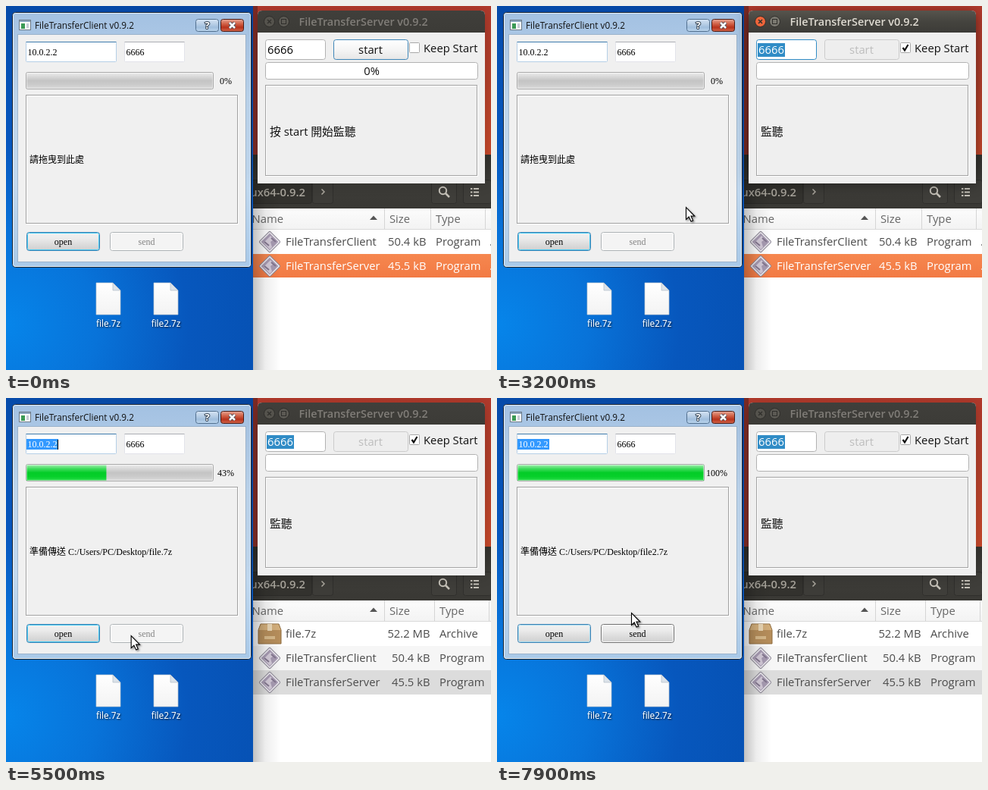
An HTML page for the animation above (8 s loop, 640 by 480 pixels).

```html
<!DOCTYPE html>
<html lang="zh-Hant">
<head>
<meta charset="utf-8">
<title>File transfer</title>
<style>
html, body { margin: 0; width: 100%; height: 100%; overflow: hidden; }
svg { display: block; width: 640px; height: 480px; }
text { white-space: pre; }
.ui { font: 14.8px "Open Sans", "Noto Sans CJK TC", "Noto Sans CJK JP", sans-serif; }
.win { font: 12px "Liberation Serif", "Noto Sans CJK TC", "Noto Sans CJK JP", serif; }
.cap { font: 11.8px "Open Sans", sans-serif; }
.mid { text-anchor: middle; }
</style>
</head>
<body>
<svg id="stage" viewBox="0 0 640 480" xmlns="http://www.w3.org/2000/svg"></svg>
<script>
const attrs = o => Object.entries(o).map(([k, v]) => ` ${k}="${v}"`).join('');
const rect = (x, y, w, h, fill, o = {}) =>
  `<rect${attrs({ x, y, width: w, height: h, fill, ...o })}/>`;
// Crisp one-pixel border around the given pixel box.
const box = (x, y, w, h, fill, stroke, rx = 0, o = {}) =>
  rect(x + .5, y + .5, w - 1, h - 1, fill, { stroke, rx, ...o });
const path = (d, o = {}) => `<path${attrs({ d, fill: 'none', ...o })}/>`;
const text = (x, y, s, cls, fill = '#000', o = {}) =>
  `<text${attrs({ x, y, class: cls, fill, ...o })}>${s}</text>`;
const group = (id, body, o = {}) => `<g${attrs({ id, ...o })}>${body}</g>`;
const circle = (cx, cy, r, fill, o = {}) => `<circle${attrs({ cx, cy, r, fill, ...o })}/>`;
const stops = colors => colors.map((c, i) =>
  `<stop offset="${i / (colors.length - 1)}" stop-color="${c}"/>`).join('');
const grad = (id, ...colors) =>
  `<linearGradient id="${id}" x2="0" y2="1">${stops(colors)}</linearGradient>`;

const defs = `<defs>
  <radialGradient id="sky" gradientUnits="userSpaceOnUse" cx="0" cy="420" r="480">
    ${stops(['#0685ea', '#0873d9', '#0757bd', '#0650b2', '#06459f'])}</radialGradient>
  <linearGradient id="vmShadow"><stop stop-color="#000" stop-opacity=".24"/>
    <stop offset=".45" stop-color="#000" stop-opacity=".07"/><stop offset="1" stop-opacity="0"/></linearGradient>
  <filter id="blur" x="-20%" y="-20%" width="140%" height="140%"><feGaussianBlur stdDeviation="9"/></filter>
  <filter id="soft" x="-30%" y="-30%" width="180%" height="180%"><feDropShadow dx="1.5" dy="1.5" stdDeviation="1" flood-opacity=".45"/></filter>
  <filter id="label" x="-20%" y="-40%" width="150%" height="200%"><feDropShadow dx="1" dy="1" stdDeviation="1" flood-opacity=".9"/></filter>
  <clipPath id="vm"><path d="M0 0H326V480H0Z"/></clipPath>
  ${grad('wall', '#b23a2c', '#b8412c', '#c94a2c')}
  ${grad('glassOn', '#a3c1e2', '#bcd4ec', '#c2d9ef', '#a9c9e8')}
  ${grad('glassOff', '#cfdfef', '#dae6f3', '#d7e4f2')}
  ${grad('closeOn', '#e6a797', '#d5694f', '#b8321b', '#d1664c')}
  ${grad('helpOn', '#d5e4f4', '#bdd2e8', '#a0bedd', '#bcd6ee')}
  ${grad('buttonUp', '#f2f2f2', '#ebebeb', '#dcdcdc', '#cfcfcf')}
  ${grad('buttonHot', '#eaf6fd', '#d5effc', '#b7e2f9', '#a7d9f5')}
  ${grad('buttonDown', '#c2e4f6', '#a9d8ef', '#7fbfe0')}
  ${grad('track', '#eeeeee', '#d9d9d9', '#c4c4c4', '#cccccc', '#dddddd')}
  ${grad('green', '#a4efb0', '#3fdc5c', '#04cc28', '#06d02a', '#2cdc4c')}
  ${grad('darkOn', '#56544d', '#45443f', '#3c3b37')}
  ${grad('darkOff', '#403f3b', '#3c3b37')}
  ${grad('bar', '#35342f', '#3e3d39', '#393834')}
  ${grad('pushUp', '#ffffff', '#f5f5f5', '#e6e6e6')}
  ${grad('pushDown', '#cfcfcf', '#dcdcdc')}
  ${grad('header', '#fcfcfc', '#f3f3f3')}
  ${grad('paper', '#ffffff', '#f3f3f3')}
  ${grad('orange', '#f6874f', '#f27a44')}
  ${grad('hover', '#7ab8f2', '#4a98e4')}
</defs>`;

const diamond = y => group('', rect(-10, -10, 20, 20, '#eeecf1', { stroke: '#8f8a98', rx: 1.5, transform: 'rotate(45)' }) +
  rect(-8, -8, 16, 16, '#a79bb2', { transform: 'rotate(45)' }) +
  path('M-8 1L1 -8L5 -3L1 0L3 7L0 10Z', { fill: '#d4cbd9' }) +
  path('M-7 0L-1 5M2 -5L8 0', { stroke: '#83778f', 'stroke-width': 2 }),
  { transform: `translate(348 ${y})` });

const crate = path('M336 298H360L363 306V324H333V306Z', { fill: '#b68e5b', stroke: '#8d6a3c' }) +
  path('M336.500 298.500H359.500L362.500 306H333.500Z', { fill: '#d2ae7b' }) +
  rect(345, 298, 6, 9, '#e9d6b4') + rect(341, 314, 14, 4, '#d7b98a');

const program = (name, size, y, id) => diamond(y - 5) +
  text(369, y, name, 'ui row', '#4c4c4c', { id }) ;

function fileManager() {
  const label = (x, s) => text(x, 286, s, 'ui', '#666');
  return rect(326, 0, 314, 480, '#fff') + rect(326, 0, 314, 196, 'url(#wall)') +
    rect(326, 0, 6, 196, '#7c2b25') +
    rect(326, 196, 314, 71, 'url(#bar)') +
    box(320, 229, 84, 32, '#33322e', '#2c2b28', 3) + box(404, 229, 28, 32, '#3d3c38', '#302f2c', 3) +
    text(395, 251, 'ux64-0.9.2', 'ui', '#aaa69d', { 'font-weight': 600, style: 'font-weight:600', 'text-anchor': 'end' }) +
    path('M416.500 241.500L420 245L416.500 248.500', { stroke: '#aaa69d', 'stroke-width': 1.5 }) +
    box(561, 229, 34, 32, '#3f3e3a', '#302f2c', 3) + box(603, 229, 38, 32, '#3f3e3a', '#302f2c', 3) +
    circle(576.5, 243.5, 4.7, 'none', { stroke: '#c5c1b8', 'stroke-width': 2 }) +
    path('M580 247L585 252', { stroke: '#c5c1b8', 'stroke-width': 2.5 }) +
    path('M613 241H615.500M613 245.500H615.500M613 250H615.500M617 241H624M617 245.500H624M617 250H624', { stroke: '#c5c1b8', 'stroke-width': 2 }) +
    rect(326, 267, 314, 27, 'url(#header)') + rect(326, 294, 314, 1, '#dadada') +
    label(324.5, 'Name') + label(506, 'Size') +
    path('M480 282L485 276.500L490 282Z', { fill: '#555' }) + rect(499, 267, 1, 27, '#d5d5d5') +
    group('wideCols', rect(560, 267, 1, 27, '#d5d5d5') + rect(632, 267, 1, 27, '#d5d5d5') + label(567, 'Type')) +
    group('shiftedCols', rect(565, 267, 1, 27, '#d5d5d5') + rect(637, 267, 1, 27, '#d5d5d5') + label(572, 'Type')) +
    group('listing', '');
}

function listing(received) {
  const right = received ? 559.5 : 554.5, kind = received ? 572 : 567;
  const row = (i, icon, name, size, type, fill = '#4c4c4c') => {
    const y = 316 + i * 32;
    return icon + text(369, y, name, 'ui', fill) +
      text(right, y, size, 'ui', fill, { 'text-anchor': 'end' }) + text(kind, y, type, 'ui', fill) +
      (received ? '' : text(638, y, '.', 'ui', fill));
  };
  const n = received ? 1 : 0;
  return (received
    ? rect(326, 327, 314, 32, '#f6f6f6') + rect(326, 359, 314, 32, '#dcdcdc') + row(0, crate, 'file.7z', '52.2 MB', 'Archive')
    : rect(326, 327, 314, 31, 'url(#orange)')) +
    row(n, diamond(311 + n * 32), 'FileTransferClient', '50.4 kB', 'Program') +
    row(n + 1, diamond(343 + n * 32), 'FileTransferServer', '45.5 kB', 'Program', received ? '#4c4c4c' : '#fff');
}

const sheet = path('M0 0H22L32 10V42H0Z', { fill: 'url(#paper)', stroke: '#b9c4cf', 'stroke-width': .7 }) +
  path('M22 0V10H32Z', { fill: '#dce3ea', stroke: '#b0bac4', 'stroke-width': .7 });
const desktopFile = (x, name) => group('', sheet, { transform: `translate(${x - 16} 365)` }) +
  text(x, 423, name, 'cap mid', '#fff', { filter: 'url(#label)' });

function client() {
  const button = (x, id, label) => box(x, 298, 97, 25, 'url(#buttonUp)', '#707070', 3, { id }) +
    box(x + 1, 299, 95, 23, 'none', '#fff', 2, { id: id + 'Rim' }) +
    text(x + 48.5, 315, label, 'win mid', '#000', { id: id + 'Text' });
  return box(8, 8, 316, 337, 'url(#glassOn)', '#22303f', 4, { id: 'frame' }) +
    box(9, 9, 314, 335, 'none', '#e6f1fb', 3) +
    rect(16, 38, 300, 299, '#f0f0f0') + box(15, 37, 302, 301, 'none', '#8fa5bb', 0, { opacity: .6 }) +
    box(17, 18, 16, 14, '#fbfbfb', '#6d7b88') + rect(18, 19, 14, 2, '#8ba6c0') +
    rect(20, 23, 5, 7, '#3c9a55') + rect(27, 23, 3, 6, '#c5cdd4') +
    text(38, 30, 'FileTransferClient v0.9.2', 'cap', '#111') +
    box(250, 17, 31, 17, 'url(#helpOn)', '#52708f', 3, { id: 'help' }) +
    text(265.5, 30, '?', 'cap mid', '#fff', { style: 'font-weight:700;font-size:13px', stroke: '#3d4c5c', 'stroke-width': 2, 'paint-order': 'stroke' }) +
    box(283, 17, 31, 17, 'url(#closeOn)', '#4a1c16', 3, { id: 'close' }) +
    [['#4b4c58', 4.5], ['#fff', 2.5]].map(([stroke, w]) =>
      path('M295 22L302 29M302 22L295 29', { stroke, 'stroke-width': w })).join('') +
    box(26, 47, 120, 27, '#fff', '#b5cfe7', 1, { id: 'host' }) + path('M26.500 47.500H145.500', { stroke: '#3d7bad', id: 'hostTop' }) +
    rect(27, 54, 42, 14, '#3399ff', { id: 'hostSel' }) +
    text(28.5, 65, '10.0.2.2', 'win', '#000', { id: 'hostText' }) + rect(68, 55, 1, 13, '#000', { id: 'caret' }) +
    box(156, 47, 80, 27, '#fff', '#e2e3ea', 1) + path('M156.500 47.500H235.500', { stroke: '#abadb3' }) +
    text(158.5, 65, '6666', 'win') +
    box(26, 87, 248, 23, 'url(#track)', '#a9a9a9', 2) +
    rect(27, 88, 0, 21, 'url(#green)', { id: 'done' }) +
    box(27, 88, 246, 21, 'none', '#fff', 1, { opacity: .45 }) +
    text(290, 103, '0%', 'win mid', '#000', { id: 'percent' }) +
    box(27, 118, 280, 170, 'none', '#fff') + box(26, 117, 280, 170, 'none', '#a0a0a0') +
    text(31, 207, '', 'win', '#000', { id: 'message' }) +
    button(27, 'open', 'open') + button(137, 'send', 'send');
}

function server() {
  return rect(332, 10, 300, 224, '#000', { filter: 'url(#blur)', id: 'serverShadow' }) +
    path('M332 234V12Q332 6 338 6H626Q632 6 632 12V234Z', { fill: '#efefef' }) +
    path('M332 35V12Q332 6 338 6H626Q632 6 632 12V35Z', { id: 'serverBar' }) +
    circle(347.5, 20.5, 7, '#55534d', { stroke: '#2d2c29', id: 'serverClose' }) +
    path('M345 18L350 23M350 18L345 23', { stroke: '#33322e', 'stroke-width': 1.6 }) +
    circle(366.5, 20.5, 7, '#5c5a54', { stroke: '#2d2c29', id: 'serverMax' }) +
    box(363, 17, 7, 7, 'none', '#2f2e2b') +
    text(386.5, 26, 'FileTransferServer v0.9.2', 'ui', '#807d78', { id: 'serverTitle', style: 'font-weight:600;font-size:14.4px' }) +
    box(342, 44, 80, 27, '#fff', '#b2b2b2', 3, { id: 'port' }) + rect(344, 49, 36, 18, '#308cc6', { id: 'portSel' }) +
    text(345, 63, '6666', 'ui', '#000', { id: 'portText' }) +
    box(432, 44, 99, 27, 'url(#pushUp)', '#4d8fbd', 3, { id: 'start' }) +
    text(481, 63, 'start', 'ui mid', '#111', { id: 'startText' }) +
    box(532, 48, 14, 14, '#fff', '#a8a8a8', 1, { id: 'check' }) +
    path('M535.500 55L538 58.500L542.500 51', { stroke: '#111', 'stroke-width': 2.2, id: 'tick' }) +
    text(551, 61, 'Keep Start', 'ui', '#111') +
    box(342, 74, 281, 23, '#fff', '#b2b2b2', 3) + text(482.5, 91, '0%', 'ui mid', '#111', { id: 'received' }) +
    box(343, 105, 280, 120, 'none', '#fff') + box(342, 104, 280, 120, 'none', '#a3a3a3') +
    text(348, 171, '', 'ui', '#111', { id: 'status' });
}

const stage = document.getElementById('stage');
stage.innerHTML = defs + fileManager() + rect(326, 196, 36, 284, 'url(#vmShadow)') +
  group('', rect(0, 0, 326, 480, 'url(#sky)') +
    box(97, 358, 76, 71, 'url(#hover)', '#a9d2f7', 2, { id: 'pick', opacity: .75 }) +
    desktopFile(135, 'file.7z') + desktopFile(211, 'file2.7z') + client(), { 'clip-path': 'url(#vm)' }) +
  server() +
  group('ghost', sheet, { opacity: .55 }) +
  group('arrow', path('M.5 .5V16.500L4.200 13L7 19L9.600 17.900L7 12H11.800Z',
    { fill: '#fff', stroke: '#000', 'stroke-width': 1.1 }), { filter: 'url(#soft)' }) +
  group('resize', path('M0 -11L4.500 -6H1.500V6H4.500L0 11L-4.500 6H-1.500V-6H-4.500Z',
    { fill: '#fff', stroke: '#000', 'stroke-width': 1.1 }));

const el = {};
stage.querySelectorAll('[id]').forEach(e => { if (e.id) el[e.id] = e; });
const set = (id, o) => { for (const k in o) el[id].setAttribute(k, o[k]); };
const show = (id, on) => set(id, { visibility: on ? 'visible' : 'hidden' });
const say = (id, s) => { if (el[id].textContent !== s) el[id].textContent = s; };
const within = (t, a, b) => t >= a && t < b;

// Pointer route: time, x, y.
const route = [
  [400, 630, 137], [1200, 570, 57], [1600, 570, 57], [2000, 470, 52], [2700, 470, 52],
  [3200, 249, 265], [3600, 141, 363], [3900, 141, 364], [4500, 168, 215], [4600, 168, 220],
  [5000, 163, 310], [5400, 163, 310], [6300, 178, 338], [6700, 212, 376], [6900, 212, 374],
  [7300, 172, 225], [7500, 172, 228], [7900, 177, 283]
];
function pointer(t) {
  const i = Math.max(1, route.findIndex(p => p[0] >= t));
  const [a, x0, y0] = route[i - 1], [b, x1, y1] = route[i];
  const k = Math.max(0, (t - a) / (b - a));
  return [x0 + (x1 - x0) * k, y0 + (y1 - y0) * k];
}

function pushButton(id, state) {
  const [fill, stroke, rim, ink] = {
    normal: ['url(#buttonUp)', '#707070', '#fafafa', '#000'],
    primary: ['url(#buttonUp)', '#3c7fb1', '#48cdf4', '#000'],
    calm: ['url(#buttonUp)', '#3c7fb1', '#a5dcf0', '#000'],
    hot: ['url(#buttonHot)', '#3c7fb1', '#f2fbff', '#000'],
    down: ['url(#buttonDown)', '#2c628b', '#9ecbe2', '#000'],
    off: ['#f4f4f4', '#adb2b5', '#fcfcfc', '#838383']
  }[state];
  set(id, { fill, stroke });
  set(id + 'Rim', { stroke: rim });
  set(id + 'Text', { fill: ink });
}

let wasReceived;
function draw(t) {
  const clientOn = !within(t, 3700, 5200) && !within(t, 6700, 7200);
  const serverOn = within(t, 1400, 3700);
  const listening = t >= 2400, received = t >= 5400;
  const selected = t >= 5200 && clientOn;

  set('frame', { fill: clientOn ? 'url(#glassOn)' : 'url(#glassOff)', stroke: clientOn ? '#18222e' : '#66717d' });
  set('help', { fill: clientOn ? 'url(#helpOn)' : 'url(#glassOff)', stroke: clientOn ? '#52708f' : '#8696a8' });
  set('close', { fill: clientOn ? 'url(#closeOn)' : 'url(#glassOff)', stroke: clientOn ? '#4a1c16' : '#8696a8' });
  set('host', { stroke: clientOn ? '#b5cfe7' : '#e2e3ea' });
  set('hostTop', { stroke: clientOn ? '#3d7bad' : '#abadb3' });
  show('hostSel', selected);
  set('hostText', { fill: selected ? '#fff' : '#000' });
  const focusAt = t >= 7200 ? 7200 : t >= 5200 ? 5200 : 400;
  show('caret', clientOn && t >= focusAt && Math.floor((t - focusAt) / 500) % 2 === 0);

  const progress = Math.min(1, Math.max(0, (t - 5200) / 700));
  set('done', { width: 246 * progress });
  say('percent', Math.round(progress * 100) + '%');
  say('message', t < 4600 ? '請拖曳到此處'
    : t < 5900 ? '準備傳送 C:/Users/PC/Desktop/file.7z'
    : t < 7400 ? '傳送文件 C:/Users/PC/Desktop/file.7z 成功'
    : '準備傳送 C:/Users/PC/Desktop/file2.7z');
  pushButton('open', !clientOn ? 'normal' : t >= 7200 ? 'calm' : 'primary');
  pushButton('send', within(t, 4900, 5100) ? 'hot' : within(t, 5100, 5200) ? 'down'
    : within(t, 4600, 4900) || t >= 7400 ? 'normal' : 'off');

  set('serverBar', { fill: serverOn ? 'url(#darkOn)' : 'url(#darkOff)' });
  set('serverShadow', { opacity: serverOn ? .5 : .22 });
  set('serverClose', { fill: serverOn ? '#f0653a' : '#55534d' });
  set('serverMax', { fill: serverOn ? '#7b7971' : '#5c5a54' });
  set('serverTitle', { fill: serverOn ? '#dfdbd2' : '#807d78' });
  set('port', { stroke: listening && serverOn ? '#308cc6' : '#b2b2b2' });
  show('portSel', listening);
  set('portText', { fill: listening ? '#fff' : '#000' });
  set('start', {
    fill: listening ? '#eeeeee' : t >= 2300 ? 'url(#pushDown)' : 'url(#pushUp)',
    stroke: listening ? '#cbcbcb' : '#3f86b8'
  });
  set('startText', { fill: listening ? '#bdbdbd' : '#111' });
  set('check', { fill: within(t, 1400, 1700) ? '#d2d2d2' : '#fff' });
  show('tick', t >= 1700);
  show('received', !listening);
  say('status', listening ? '監聽' : '按 start 開始監聽');

  if (received !== wasReceived) {
    el.listing.innerHTML = listing(received);
    show('wideCols', !received);
    show('shiftedCols', received);
    wasReceived = received;
  }

  const [x, y] = pointer(t);
  const resizing = within(t, 6200, 6400);
  const second = within(t, 6600, 7300);
  show('pick', within(t, 3600, 4600) || second);
  set('pick', { x: second ? 173.5 : 97.5 });
  show('ghost', within(t, 4000, 4600) || within(t, 7000, 7400));
  set('ghost', { transform: `translate(${x - 16} ${y - 12})` });
  show('arrow', t >= 400 && !resizing);
  set('arrow', { transform: `translate(${x} ${y})` });
  show('resize', resizing);
  set('resize', { transform: `translate(${x} ${y})` });
}

const begin = performance.now();
function tick() {
  const t = (performance.now() - begin) % 8000;
  draw(Math.floor(t / 100) * 100);
  requestAnimationFrame(tick);
}
tick();
</script>
</body>
</html>
```
